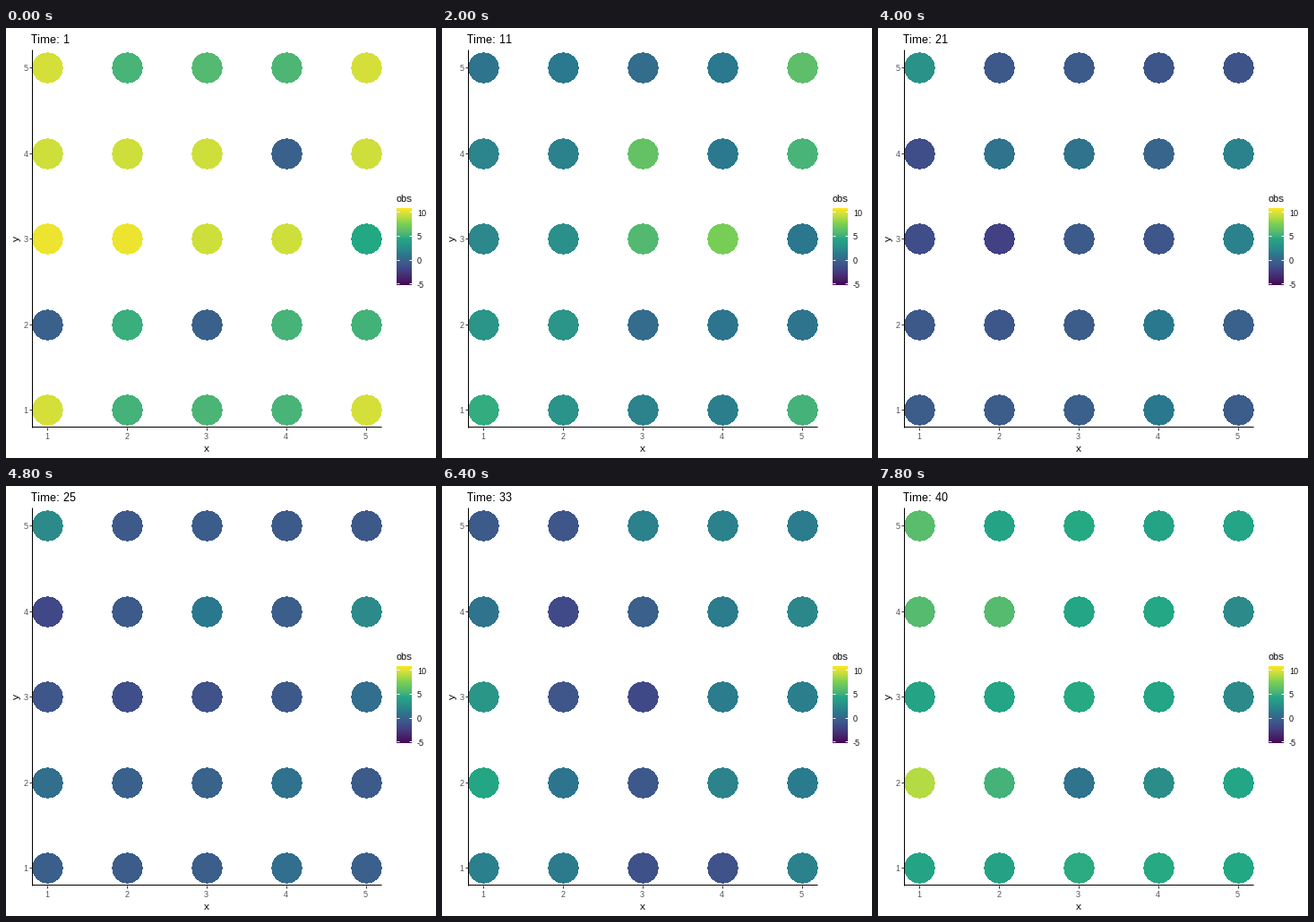
These frames come from a looping animation (480x480 px, 8 s). A matplotlib script:

```python
import numpy as np
import matplotlib.pyplot as plt
from matplotlib.animation import FuncAnimation
from matplotlib.colors import ListedColormap, to_rgb
from matplotlib.patches import Circle

plt.rcParams.update({"font.family": "Liberation Sans",
                     "text.hinting": "native", "text.hinting_factor": 1})

SIZE, DPI = 480, 100
PX = 72 / DPI
STEPS, STEP_MS = 40, 200
XS = 46 + 89 * np.arange(5)
YS = np.ceil(44 + 95.5 * np.arange(5))
GREY = "#4d4d4d"
at = np.s_

# Linear RGB to XYZ, scaled so that white is (1, 1, 1)
TO_XYZ = np.array([[0.4124, 0.3576, 0.1805],
                   [0.2126, 0.7152, 0.0722],
                   [0.0193, 0.1192, 0.9505]])
TO_XYZ /= TO_XYZ.sum(axis=1, keepdims=True)


def lab_ramp(colors, n=512):
    """Blend colours evenly in Lab; its axes are linear in f(X), f(Y), f(Z)."""
    rgb = np.array([to_rgb(c) for c in colors])
    lin = np.where(rgb > 0.04045, ((rgb + 0.055) / 1.055) ** 2.4, rgb / 12.92)
    xyz = lin @ TO_XYZ.T
    f = np.where(xyz > 0.008856, np.cbrt(xyz), 7.787 * xyz + 16 / 116)
    grid, knots = np.linspace(0, 1, n), np.linspace(0, 1, len(colors))
    f = np.stack([np.interp(grid, knots, c) for c in f.T], axis=1)
    xyz = np.where(f > 0.2069, f ** 3, (f - 16 / 116) / 7.787)
    lin = np.clip(xyz @ np.linalg.inv(TO_XYZ).T, 0, 1)
    rgb = np.where(lin > 0.0031308, 1.055 * lin ** (1 / 2.4) - 0.055, 12.92 * lin)
    return ListedColormap(np.clip(rgb, 0, 1))


cmap = lab_ramp(["#440154", "#414487", "#2a788e", "#22a884", "#7ad151", "#fde725"])
rng = np.random.default_rng(4)
times, fields = [], []


def field(time, base, *patches):
    """A nearly even field with a few patches, in percent of the range."""
    levels = base + rng.normal(0, 1.5, (5, 5))
    for level, where in patches:
        levels[where] = level
    times.append(time)
    fields.append(levels.ravel() / 100)


# Row 0 is y = 5, column 0 is x = 1
field(1, 66, (92, at[1:3]), (93, at[::4, ::4]), (97, at[2, :2]),
      (31, at[3, :3:2]), (31, at[1, 3]), (60, at[2, 4]))
field(7, 67, (76, at[1::3, 0]), (79, at[2, :2]), (56, at[3, :3:2]),
      (60, at[0, 2::2]), (86, at[2, 3]), (78, at[4, 2]))
field(15, 13, (82, at[0, 4]), (81, at[1, 2]), (71, at[2, 2:4]),
      (64, at[1::3, 4]), (48, at[3:, 0]), (36, at[3:, 1]), (20, at[1:3, 1]))
field(21, 29, (51, at[0, 0]), (24, at[1:3, 0]), (38, at[1, 1:3]),
      (44, at[1:3, 4]), (40, at[3:, 3]), (19, at[2, 1]))
field(29, 29, (45, at[::3, 0]), (19, at[1, :2]), (42, at[1, 2]),
      (52, at[1, 4]), (35, at[3, 1:4]), (22, at[2, 2]))
field(36, 52, (22, at[1:, 2]), (25, at[:3, 1]), (70, at[2:4, 0]),
      (16, at[0, 0]), (20, at[4, 3]), (42, at[1, 4]), (42, at[3, 1]))
field(40, 59, (88, at[3, 0]), (38, at[3, 2]), (69, at[1, :2]),
      (70, at[0, 0]), (48, at[1:3, 4]), (49, at[3, 3]), (65, at[3, 1]))


def levels_at(time):
    return [np.interp(time, times, track) for track in np.transpose(fields)]


fig = plt.figure(figsize=(SIZE / DPI, SIZE / DPI), dpi=DPI, facecolor="white")
ax = fig.add_axes([0, 0, 1, 1])
ax.axis("off")


def text(x, y, s, px, color="black", ha="center", va="baseline", **kw):
    return ax.text(x, y, s, fontsize=px * PX, color=color, ha=ha, va=va, **kw)


def line(xs, ys, color="black"):
    ax.plot(xs, ys, color=color, lw=PX, solid_capstyle="butt", zorder=5)


# Axes
line([29, 29], [24, 446])
line([29, 419], [445, 445])
for i, (x, y) in enumerate(zip(XS, YS)):
    line([x, x], [446, 449], "#333333")
    line([26, 29], [y, y], "#333333")
    text(x - 0.4, 459, str(i + 1), 9, GREY)
    text(24.5, y + 4, str(5 - i), 9, GREY, ha="right")
text(224, 473, "x", 11)
text(12, 235.5, "y", 11, va="center", rotation=90)
title = text(28.5, 17, "", 13, ha="left")

# Colour bar
text(435.5, 194, "obs", 11, ha="left")
ax.imshow(np.linspace(1, 0, 256)[:, None], cmap=cmap, aspect="auto",
          extent=(436, 453, 287, 201), interpolation="bilinear")
for value in (10, 5, 0, -5):
    y = 258.6 - 5.33 * value
    line([436, 439.4], [y, y], "white")
    line([449.6, 453], [y, y], "white")
    text(459, y + 4.4, str(value), 9, ha="left")

# Points: a disc and a thin ring set half a pixel lower right
dots = []
for y in YS:
    for x in XS:
        disc = Circle((x, y), 15.9, lw=0, antialiased=False, zorder=4)
        ring = Circle((x + 0.5, y + 0.5), 16.1, fill=False, lw=0.9 * PX,
                      antialiased=False, zorder=4)
        dots.append((ax.add_patch(disc), ax.add_patch(ring)))

ax.set_xlim(0, SIZE)
ax.set_ylim(SIZE, 0)


def draw(i):
    title.set_text(f"Time: {i + 1}")
    for (disc, ring), level in zip(dots, levels_at(i + 1)):
        color = cmap(level)
        disc.set_facecolor(color)
        ring.set_edgecolor(color)
    return []


anim = FuncAnimation(fig, draw, frames=STEPS, init_func=lambda: draw(0),
                     interval=STEP_MS, repeat=True, repeat_delay=0)
plt.show()
```
